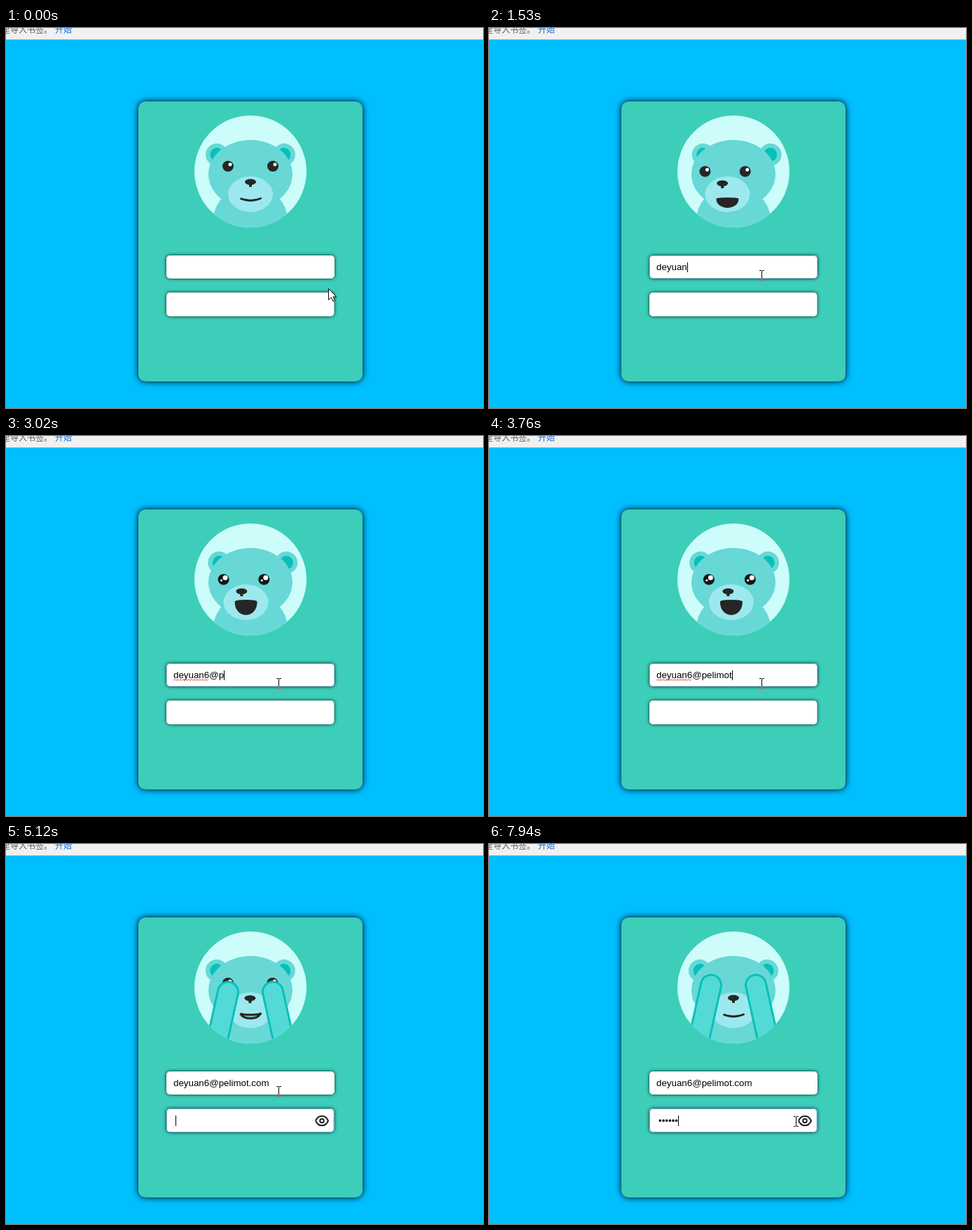
Recreate the animation shown at these times as an HTML page with a canvas. Size 681x543 px, loop 7990 ms.

```html
<!DOCTYPE html>
<html lang="zh">
<head>
<meta charset="utf-8">
<title>Bear login</title>
<style>
html, body { margin: 0; width: 100%; height: 100%; overflow: hidden; background: #00bfff; }
canvas { display: block; }
</style>
</head>
<body>
<canvas id="stage" width="681" height="543"></canvas>
<script>
const ctx = document.getElementById('stage').getContext('2d');
const LOOP = 7990;
const SANS = '13.333px "Liberation Sans", Arial, sans-serif';
const CJK = '12px "Noto Sans CJK SC", "Noto Sans CJK", "Noto Sans", sans-serif';

const EMAIL = 'deyuan6@pelimot.com';
const EMAIL_KEYS = [840, 960, 1090, 1210, 1340, 1470, 1670, 2140, 2860, 3250,
  3340, 3440, 3540, 3630, 3720, 3950, 4130, 4240, 4360];
const PASS_KEYS = [6080, 6170, 6340, 6570, 6760, 6940];
const FOCUS_EMAIL = 370, FOCUS_PASS = 4840, AT_TYPED = 2140;

const DARK = '#262626', FUR = '#67d8d6', TEAL = '#08c0ba', MUZZLE = '#9de8ee';

// Mouth: corner y, upper depth, lower depth, control spread
const SMILE = [243.5, 4, 4, 0.4];
const MEDIUM = [244, -0.5, 15.3, 1];
const LARGE = [237, -2, 23, 1];

const clamp = v => Math.max(0, Math.min(1, v));
const lerp = (a, b, k) => a + (b - a) * k;
const part = (t, start, len) => clamp((t - start) / len);
const easeOut = p => 1 - (1 - p) * (1 - p);
const easeBoth = p => p * p * (3 - 2 * p);
const typed = (keys, t) => keys.filter(k => k <= t).length;
const mix = (a, b, k) => a.map((v, i) => lerp(v, b[i], k));

function ellipse(x, y, rx, ry, color) {
  ctx.fillStyle = color;
  ctx.beginPath();
  ctx.ellipse(x, y, rx, ry, 0, 0, Math.PI * 2);
  ctx.fill();
}

function panel(x, y, w, h, r, color, blur, shade) {
  ctx.save();
  ctx.shadowColor = shade;
  ctx.shadowBlur = blur;
  ctx.fillStyle = color;
  ctx.beginPath();
  ctx.roundRect(x, y, w, h, r);
  ctx.fill();
  ctx.restore();
}

function drawPage() {
  ctx.fillStyle = '#00bfff';
  ctx.fillRect(0, 0, 681, 543);
  ctx.fillStyle = '#f1f1f1';
  ctx.fillRect(0, 0, 681, 16);
  ctx.fillStyle = '#b4b8ba';
  ctx.fillRect(0, 16, 681, 1);
  ctx.font = CJK;
  ctx.fillStyle = '#555';
  ctx.fillText('里导入书签。', -6, 7);
  ctx.fillStyle = '#1566d6';
  ctx.fillText('开始', 70, 7);
  panel(189, 105, 320, 400, 10, '#3cceb9', 10, '#000');
}

function drawEye(x, y, glee) {
  ellipse(x, y, 8, 7.8, glee > 0.5 ? '#141414' : DARK);
  ellipse(x + lerp(3, 2.5, glee), y - 2.5, lerp(2.5, 3.5, glee), lerp(2.5, 3.5, glee), '#fff');
  if (glee > 0.05) ellipse(x - 3, y + 1.3, 1.5 * glee, 1.5 * glee, '#fff');
}

function drawMouth(x, shape, fill) {
  const [y, up, low, spread] = shape, w = 14.5, c = w * spread;
  ctx.beginPath();
  ctx.moveTo(x - w, y);
  ctx.bezierCurveTo(x - c, y + up, x + c, y + up, x + w, y);
  ctx.bezierCurveTo(x + c, y + low, x - c, y + low, x - w, y);
  ctx.fillStyle = DARK;
  ctx.globalAlpha = fill;
  ctx.fill();
  ctx.globalAlpha = 1;
  ctx.strokeStyle = DARK;
  ctx.lineWidth = 3;
  ctx.lineJoin = 'round';
  ctx.stroke();
}

function drawPaw(side, drop) {
  ctx.save();
  ctx.translate(349 + side * 32, 201.5 + drop);
  ctx.rotate(-side * 12.5 * Math.PI / 180);
  ctx.beginPath();
  ctx.roundRect(-14.5, -14.5, 29, 140, 14.5);
  ctx.fillStyle = '#53dad7';
  ctx.fill();
  ctx.strokeStyle = TEAL;
  ctx.lineWidth = 3;
  ctx.stroke();
  ctx.restore();
}

function drawBear(t) {
  // Gaze follows the typed length, each key easing in
  const n = EMAIL_KEYS.reduce((sum, k) => sum + easeOut(part(t, k, 170)), 0);
  const rest = 1 - easeOut(part(t, FOCUS_PASS, 490));
  const look = easeBoth(part(t, FOCUS_EMAIL, 310)) * rest;
  const glee = easeOut(part(t, AT_TYPED, 180)) * rest;
  const shift = (-12 + 0.62 * n) * look;
  const eyeY = 197.5 + 7.5 * look;
  const farEye = (-7 + 0.009 * n * n) * look;
  const noseX = 349 + (-21 + 0.93 * n) * look;
  const noseY = 220 + 2 * look;
  const ear = (7 - 0.41 * n) * look;

  ellipse(349, 205, 80, 80, '#cdfdfb');
  for (const x of [301, 397]) {
    ellipse(x + ear, 181, 16, 16, FUR);
    ellipse(x + ear, 181, 9.5, 10, TEAL);
  }
  ctx.save();
  ctx.beginPath();
  ctx.arc(349, 205, 80, 0, Math.PI * 2);
  ctx.clip();
  ellipse(349, 275, 53, 50, FUR);
  ellipse(349, 209, 60, 49, FUR);
  drawEye(317 + shift, eyeY, glee);
  drawEye(381 + shift + farEye, eyeY, glee);
  ellipse(349 + shift, 237.5, 32, 25.5, MUZZLE);
  ellipse(noseX, noseY, 8, 4.2, DARK);
  ctx.fillRect(noseX - 2, noseY, 4, 7);
  drawMouth(349 + shift, mix(mix(SMILE, MEDIUM, look), LARGE, glee), look);
  if (t >= 4860) {
    const drop = 100 * (1 - easeOut(part(t, 4860, 380)));
    drawPaw(-1, drop);
    drawPaw(1, drop);
  }
  ctx.restore();
}

function drawCaret(x, y, h, t, start, keys) {
  const last = keys.filter(k => k <= t).pop() || start;
  if (Math.floor((t - last) / 500) % 2) return;
  ctx.fillStyle = '#000';
  ctx.fillRect(Math.round(x), y, 1, h);
}

function drawSquiggle(x0, x1, y) {
  ctx.beginPath();
  for (let x = x0, i = 0; x <= x1; x += 2, i++) ctx.lineTo(x, y + (i % 2 ? -1 : 1));
  ctx.strokeStyle = '#e03030';
  ctx.lineWidth = 1;
  ctx.stroke();
}

function drawEyeIcon() {
  ctx.strokeStyle = '#222';
  ctx.lineWidth = 2;
  ctx.beginPath();
  ctx.moveTo(442, 395.5);
  ctx.bezierCurveTo(446, 386.5, 456, 386.5, 460, 395.5);
  ctx.bezierCurveTo(456, 404.5, 446, 404.5, 442, 395.5);
  ctx.stroke();
  ctx.beginPath();
  ctx.arc(451, 395.5, 2.8, 0, Math.PI * 2);
  ctx.stroke();
}

function focusEdge(x, y, w, h, color) {
  ctx.strokeStyle = color;
  ctx.lineWidth = 1;
  ctx.beginPath();
  ctx.roundRect(x + 0.5, y + 0.5, w - 1, h - 1, 4.5);
  ctx.stroke();
}

function drawForm(t) {
  const onEmail = t >= FOCUS_EMAIL && t < FOCUS_PASS, onPass = t >= FOCUS_PASS;
  panel(229, 325, 240, 33, 5, '#fff', 5, 'rgba(0,0,0,.85)');
  panel(229, 378, 239.5, 34, 5, '#fff', 5, 'rgba(0,0,0,.85)');
  if (onEmail) focusEdge(229, 325, 240, 33, 'rgba(70,110,200,.45)');
  if (onPass) focusEdge(229, 378, 239.5, 34, 'rgba(40,130,220,.6)');

  ctx.font = SANS;
  ctx.fillStyle = '#000';
  const mail = EMAIL.slice(0, typed(EMAIL_KEYS, t));
  ctx.fillText(mail, 239, 346);
  const mailEnd = 239 + ctx.measureText(mail).width;
  if (onEmail) {
    if (t >= AT_TYPED) drawSquiggle(239, 290, 348.5);
    drawCaret(mailEnd, 335, 14, t, FOCUS_EMAIL, EMAIL_KEYS);
  }
  if (onPass) {
    const dots = '•'.repeat(typed(PASS_KEYS, t));
    ctx.fillStyle = '#000';
    ctx.fillText(dots, 242, 400);
    drawCaret(242 + ctx.measureText(dots).width, 388, 15, t, FOCUS_PASS, PASS_KEYS);
    drawEyeIcon();
  }
}

function drawArrow(x, y) {
  ctx.save();
  ctx.translate(x + 0.5, y + 0.5);
  ctx.beginPath();
  [[0, 0], [0, 16], [4, 12.5], [6.5, 18], [9, 17], [6.5, 11.5], [11, 11.5]]
    .forEach(p => ctx.lineTo(...p));
  ctx.closePath();
  ctx.fillStyle = '#fff';
  ctx.fill();
  ctx.strokeStyle = '#000';
  ctx.lineWidth = 1;
  ctx.lineJoin = 'miter';
  ctx.stroke();
  ctx.restore();
}

// The text pointer inverts what lies below it
function drawBeam(x, y) {
  ctx.save();
  ctx.globalCompositeOperation = 'difference';
  ctx.fillStyle = '#fff';
  ctx.fillRect(x, y - 6, 1, 13);
  for (const dy of [-7, 7]) {
    ctx.fillRect(x - 3, y + dy, 3, 1);
    ctx.fillRect(x + 1, y + dy, 3, 1);
  }
  ctx.restore();
}

function drawPointer(t) {
  const a = easeBoth(part(t, 20, 310)), b = easeBoth(part(t, 7470, 450));
  const x = Math.round(lerp(lerp(460, 389, a), 438, b));
  const y = Math.round(lerp(lerp(372, 353, a), 396, b));
  const inField = (y >= 325 && y < 358) || (y >= 378 && y < 412);
  (inField ? drawBeam : drawArrow)(x, y);
}

function frame(now) {
  const t = now % LOOP;
  drawPage();
  drawBear(t);
  drawForm(t);
  drawPointer(t);
}

let begin;
function tick(now) {
  if (begin === undefined) begin = now;
  frame(now - begin);
  requestAnimationFrame(tick);
}
frame(0);
requestAnimationFrame(tick);
</script>
</body>
</html>
```
